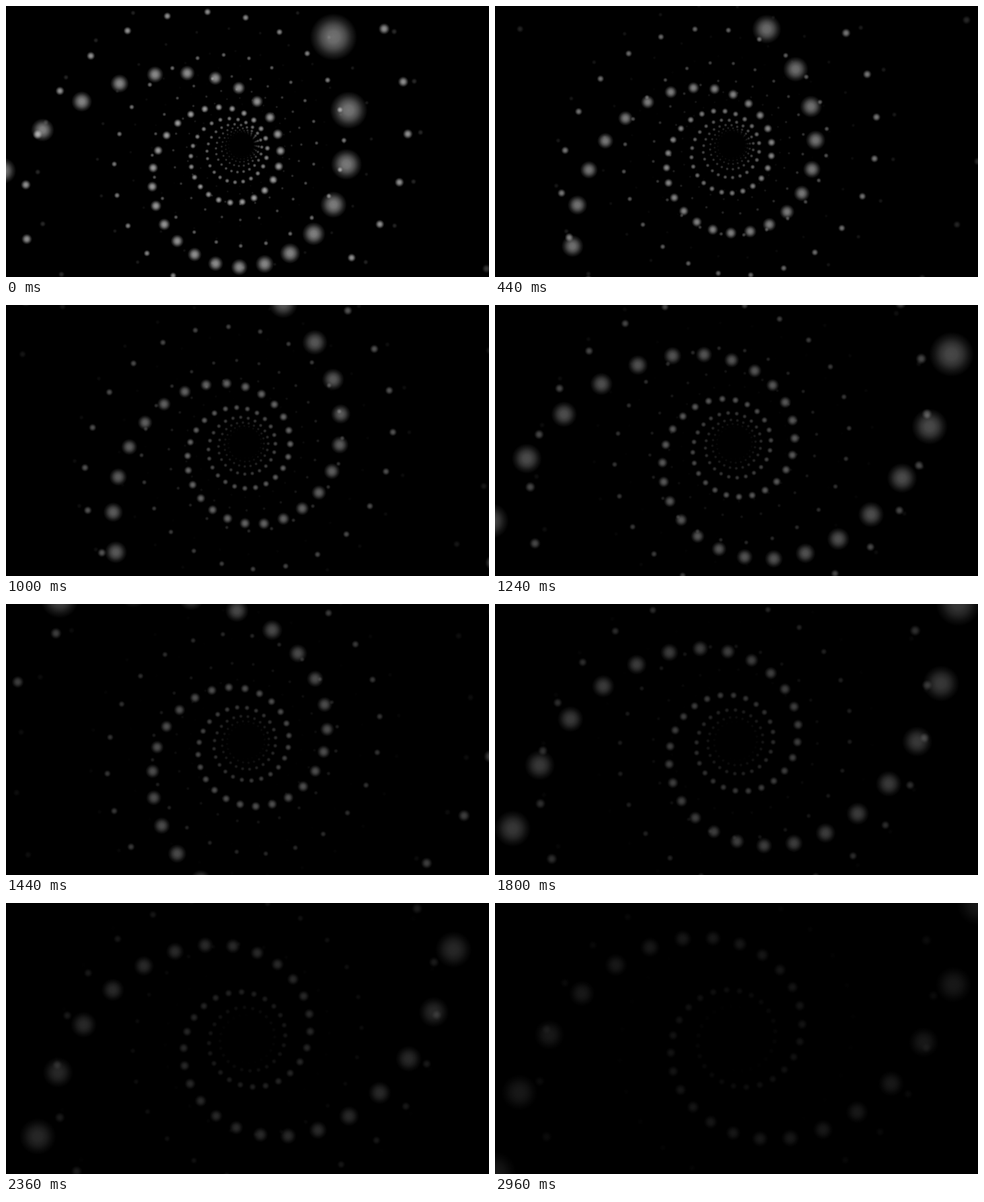
An HTML page with a canvas that plays this animation: 718x404 px, repeating every 3000 ms.

```html
<!DOCTYPE html>
<html lang="en">
<head>
<meta charset="utf-8">
<title>Helix tunnel</title>
<style>
  html, body { margin: 0; width: 100%; height: 100%; overflow: hidden; background: #000; }
  canvas { display: block; }
</style>
</head>
<body>
<canvas id="stage" width="718" height="404"></canvas>
<script>
const W = 718, H = 404;
const LOOP = 3000, STEP = 40;
const ctx = document.getElementById('stage').getContext('2d');

const DOTS = 100;        // dots along each strand
const FOCAL = 1712;      // projected radius of the inner helix at depth 1
const DOT_SIZE = 138;    // dot radius at depth 1
const TWIST = 15.14;     // degrees between neighbouring dots
const SPEED = 0.86;      // dots travelled per step

// Each strand fades out along its length; wider rings fade sooner
const RINGS = [
  { radius: 5, light: 0.4, falloff: 2.5 },
  { radius: 3, light: 1, falloff: 1.9 },
  { radius: 1, light: 1, falloff: 1.5 }
];

const rad = deg => deg * Math.PI / 180;

// Soft disc of radius 1, scaled by the transform
const glow = ctx.createRadialGradient(0, 0, 0, 0, 0, 1);
[[0, 1], [0.25, 0.93], [0.5, 0.66], [0.75, 0.28], [1, 0]].forEach(([stop, a]) =>
  glow.addColorStop(stop, `rgba(255,255,255,${a})`));

function dot(x, y, r, alpha) {
  if (x + r < 0 || x - r > W || y + r < 0 || y - r > H) return;
  ctx.setTransform(r, 0, 0, r, x, y);
  ctx.globalAlpha = alpha;
  ctx.fillRect(-1, -1, 2, 2);
}

function draw(step) {
  ctx.setTransform(1, 0, 0, 1, 0, 0);
  ctx.globalAlpha = 1;
  ctx.fillStyle = '#000';
  ctx.fillRect(0, 0, W, H);
  ctx.fillStyle = glow;

  const roll = -0.795 * step + 0.00275 * step * step;
  const drift = 0.553 * Math.max(0, 1 - step / 72.3) ** 2;
  const driftX = drift * Math.cos(rad(149.7 + roll));
  const driftY = drift * Math.sin(rad(149.7 + roll));

  for (let i = DOTS - 1; i >= 0; i--) {
    const depth = i + 0.93 - SPEED * step;
    if (depth < 0.5) break;
    const scale = FOCAL / depth;
    const angle = rad(95.02 + i * TWIST + roll);
    const focus = Math.min(0.9, 0.37 + 0.024 * depth);
    for (const { radius, light, falloff } of RINGS) {
      const alpha = focus * light * (1 - i / DOTS) ** falloff;
      for (const side of [1, -1]) {
        const x = W / 2 + scale * (driftX + side * radius * Math.cos(angle));
        const y = H / 2 + scale * (driftY + side * radius * Math.sin(angle));
        dot(x, y, DOT_SIZE / depth, alpha);
      }
    }
  }
}

const start = performance.now();
function tick() {
  const t = (performance.now() - start) % LOOP;
  // The first pose is held for two steps
  draw(Math.max(0, Math.floor(t / STEP) - 1));
  requestAnimationFrame(tick);
}
tick();
</script>
</body>
</html>
```
